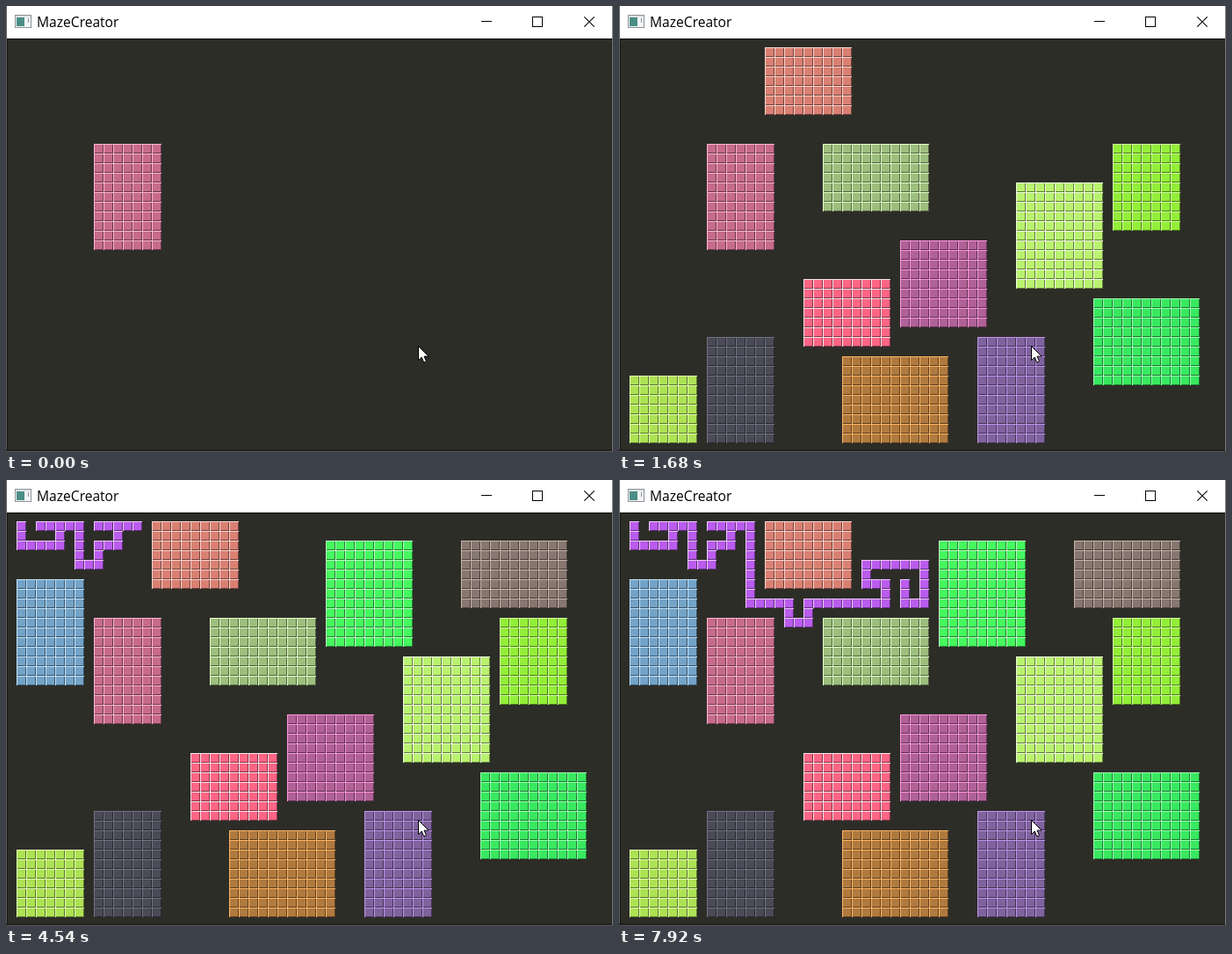
An HTML page with a canvas for the animation above (8000 ms loop, 691 by 508 pixels).

```html
<!DOCTYPE html>
<html lang="en">
<head>
<meta charset="utf-8">
<title>MazeCreator</title>
<style>
  html, body { margin: 0; width: 100%; height: 100%; overflow: hidden; background: #2d2d28; }
  canvas, svg { position: absolute; left: 0; top: 0; display: block; }
  text { font: 15.6px "Open Sans", "Noto Sans", sans-serif; }
</style>
</head>
<body>
<canvas id="board" width="691" height="508"></canvas>
<svg width="691" height="508" viewBox="0 0 691 508">
  <!-- window frame -->
  <g shape-rendering="crispEdges">
    <rect width="691" height="37" fill="#fff"/>
    <rect y="37" width="691" height="1" fill="#0c0c0b"/>
    <rect x="1" y="37" width="1" height="470" fill="#141412"/>
    <rect width="1" height="508" fill="#606060"/>
    <rect x="690" width="1" height="508" fill="#777"/>
    <rect y="505" width="690" height="2" fill="#20201d"/>
    <rect y="507" width="691" height="1" fill="#5c5559"/>
  </g>
  <!-- program icon -->
  <g shape-rendering="crispEdges">
    <rect x="10" y="10" width="19" height="15" fill="#8a9096"/>
    <rect x="11" y="11" width="17" height="2" fill="#dfe3e6"/>
    <rect x="11" y="13" width="17" height="11" fill="#f4f5f6"/>
    <rect x="12" y="13" width="9" height="10" fill="#4b8d86"/>
    <rect x="25" y="14" width="1" height="5" fill="#8a9096"/>
  </g>
  <text x="35" y="24" fill="#000">MazeCreator</text>
  <g fill="none" stroke="#000">
    <path d="M541 17.5h12M599.5 12.5h11v11h-11z" shape-rendering="crispEdges"/>
    <path d="M658.3 12.3l11.4 11.4M669.7 12.3l-11.4 11.4" stroke-width="1.1"/>
  </g>
  <path d="M469.5 387.5v16.2l3.7-3.6 2.5 5.9 2.8-1.2-2.5-5.7h5.1z" fill="#fff" stroke="#000"/>
</svg>
<script>
const LOOP = 8000, CELL = 11, LEFT = 1, TOP = 36;
const ctx = document.getElementById('board').getContext('2d');

// column, row, columns, rows, colour
const rooms = [
  [9, 11, 7, 11, '#c76b8b'],
  [21, 11, 11, 7, '#9dbe7d'],
  [41, 15, 9, 11, '#b9f26f'],
  [51, 11, 7, 9, '#93ee38'],
  [15, 1, 9, 7, '#d98073'],
  [37, 31, 7, 11, '#7f639d'],
  [49, 27, 11, 9, '#38e85f'],
  [23, 33, 11, 9, '#b07a3f'],
  [29, 21, 9, 9, '#b06197'],
  [19, 25, 9, 7, '#ff6584'],
  [9, 31, 7, 11, '#4b4b57'],
  [1, 35, 7, 7, '#ade254'],
  [1, 7, 7, 11, '#74a3c8'],
  [33, 3, 9, 11, '#45f85e'],
  [47, 3, 11, 7, '#877770']
];

// corridor moves; "<" steps back to the previous node
const moves = 'DRRUL<RDD' + 'RURUL<RDD' + 'DDRRDRUR' + 'RRRULUR' + 'RRDDLU';
const corridor = '#ba5cee';

// first time, last time, number of evenly spaced steps
const bursts = [
  [130, 430, 3], [650, 1070, 4], [1250, 1680, 4], [1860, 2260, 4],
  [2480, 3500, 8], [3680, 4690, 8], [4880, 5910, 8],
  [6070, 7010, 7], [7160, 7920, 6]
];
const times = [0, ...bursts.flatMap(([from, to, n]) =>
  Array.from({ length: n }, (_, i) => from + (to - from) * i / (n - 1)))];

function carve() {
  const dirs = { U: [0, -1], D: [0, 1], L: [-1, 0], R: [1, 0] };
  const steps = [[1, 1, 1, 1, corridor]];
  const trail = [[1, 1]];
  for (const move of moves) {
    if (move === '<') { trail.pop(); continue; }
    const [x, y] = trail[trail.length - 1], [dx, dy] = dirs[move];
    steps.push([
      x + (dx < 0 ? -2 : dx), y + (dy < 0 ? -2 : dy),
      dx ? 2 : 1, dy ? 2 : 1, corridor
    ]);
    trail.push([x + 2 * dx, y + 2 * dy]);
  }
  return steps;
}
const blocks = [...rooms, ...carve()];

// brightness up by half, with the overflow taken from the saturation
function lighter(rgb) {
  const max = Math.max(...rgb), value = max * 1.5;
  const sat = rgb.map(c => (1 - c / max) * 255);
  const top = Math.max(...sat), over = Math.max(0, value - 255);
  const keep = top ? Math.max(0, top - over) / top : 0;
  return rgb.map((c, i) => Math.min(255, value) * (1 - sat[i] * keep / 255));
}
const css = rgb => `rgb(${rgb.map(Math.round)})`;

function drawBlock([col, row, cols, rows, color]) {
  const rgb = [1, 3, 5].map(i => parseInt(color.slice(i, i + 2), 16));
  const light = css(lighter(rgb)), dark = css(rgb.map(c => c / 2));
  const fill = (style, x, y, w, h) => {
    ctx.fillStyle = style;
    ctx.fillRect(x, y, w, h);
  };
  for (let r = 0; r < rows; r++) {
    for (let c = 0; c < cols; c++) {
      const x = LEFT + (col + c) * CELL, y = TOP + (row + r) * CELL;
      fill(light, x, y, CELL, CELL);
      fill(dark, x + 1, y + 1, CELL - 1, CELL - 1);
      fill(color, x + 1, y + 1, CELL - 2, CELL - 2);
    }
  }
}

let shown = -1;
function render(now) {
  const t = now % LOOP;
  const count = times.filter(time => time <= t + 0.5).length;
  if (count !== shown) {
    ctx.fillStyle = '#2d2d28';
    ctx.fillRect(0, 0, 691, 508);
    blocks.slice(0, count).forEach(drawBlock);
    shown = count;
  }
}

const start = performance.now();
function tick() {
  render(performance.now() - start);
  requestAnimationFrame(tick);
}
tick();
</script>
</body>
</html>
```
